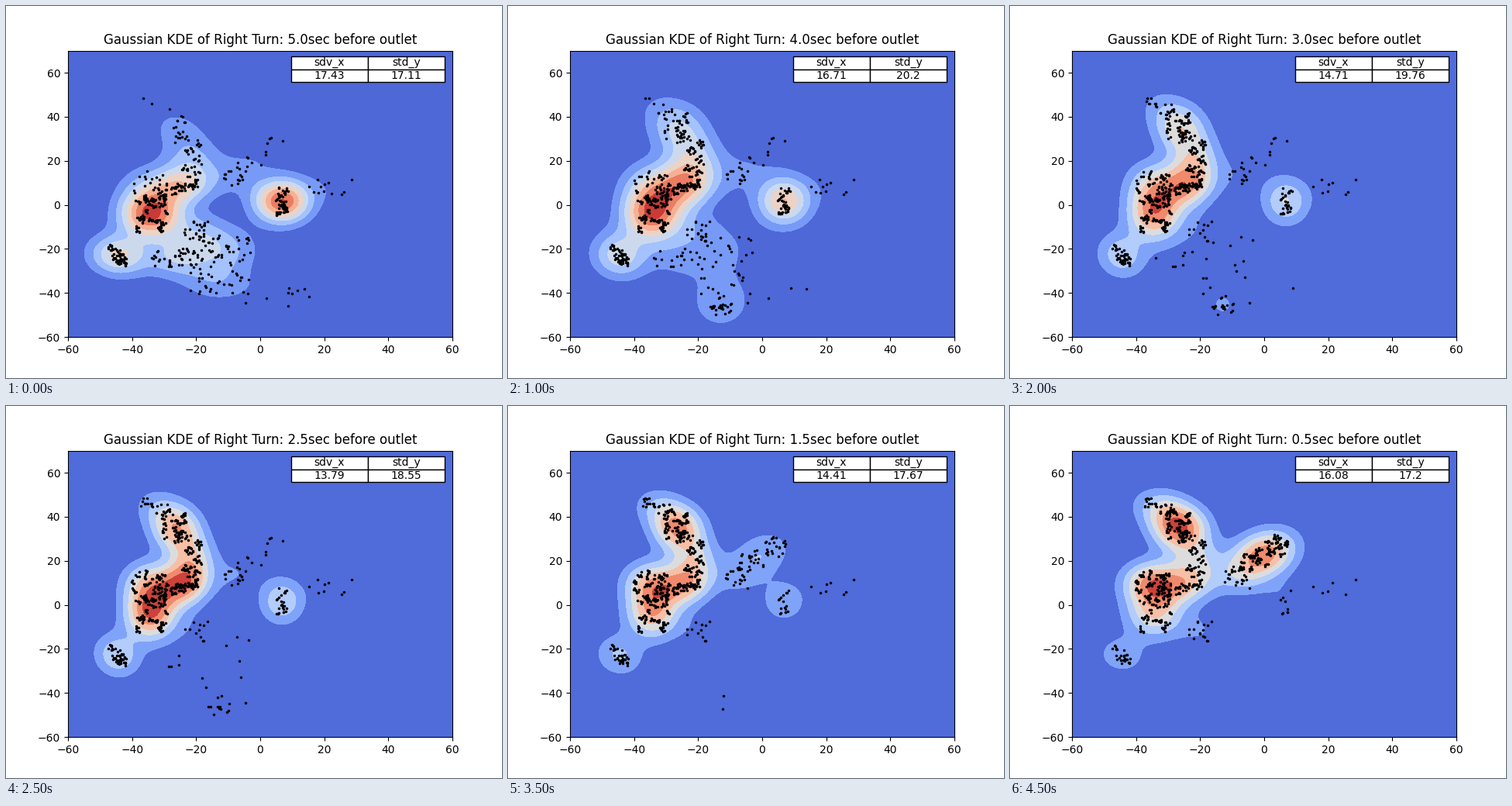
A matplotlib script that plays this animation: 640x480 px, repeating every 5 s.

```python
import numpy as np
import matplotlib.pyplot as plt
from matplotlib.animation import FuncAnimation

FRAMES = 10
STEP = np.arange(FRAMES)
T = STEP / (FRAMES - 1)

# spread shown in the table, at a few steps
KEYS = (0, 2, 3, 4, 6, 8, 9)
STD_X = np.interp(STEP, KEYS, (17.43, 16.71, 15.62, 14.71, 12.87, 15.95, 16.08))
STD_Y = np.interp(STEP, KEYS, (17.11, 20.2, 19.27, 19.76, 17.35, 17.99, 17.2))
# height of the density's peak
PEAK = np.interp(STEP, (0, 2, 6, 8, 9), (7.6, 7.8, 11, 7.5, 6.6))

BANDWIDTH = 0.335
POOL, CLUMPS = 170, 30
GX, GY = np.meshgrid(np.linspace(-60, 60, 161), np.linspace(-60, 70, 175))


def trend(start, end, hump=0):
    return start + (end - start) * T + hump * np.sin(np.pi * T)


def fade(start):
    return start * (1 - T) ** 3


def arrive(low, high, first, length):
    s = np.clip((STEP - first) / length, 0, 1)
    return low + (high - low) * s * s * (3 - 2 * s)


class Group:
    """Road users in a (sheared) box: centre, half sizes, share over time."""

    count = 0

    def __init__(self, x, y, w, h, share, slope=0, rate=6.5):
        Group.count += 1
        rng = np.random.default_rng(40 + Group.count)
        self.x, self.y, self.share, self.rate = x, y, share, rate
        self.cov = np.array([[w * w, slope * w * w],
                             [slope * w * w, h * h + (slope * w) ** 2]]) / 3
        u, v = rng.uniform(-1, 1, (2, CLUMPS))
        pick = np.arange(POOL) % CLUMPS
        jx, jy = rng.normal(0, 1, (2, POOL))
        self.px = x + w * u[pick] + 0.4 * jx
        self.py = y + h * v[pick] + slope * w * u[pick] + 0.6 * jy

    def dots(self, i):
        n = int(round(self.share[i] * self.rate))
        return self.px[:n], self.py[:n]

    def density(self, i):
        kernel = np.diag([STD_X[i], STD_Y[i]]) * BANDWIDTH
        (a, b), (_, c) = self.cov + kernel ** 2
        det = a * c - b * b
        dx, dy = GX - self.x, GY - self.y
        q = (c * dx * dx - 2 * b * dx * dy + a * dy * dy) / det
        return self.share[i] * np.exp(-q / 2) / np.sqrt(det)


groups = [
    # western junction
    Group(-34.3, -4, 5, 9, trend(21, 13, 3)),
    Group(-35, 10, 5.5, 6, trend(3, 15)),
    Group(-24.5, 8.5, 5, 2.5, trend(8, 7, 5), slope=0.35),
    # northern arm
    Group(-21.5, 20.5, 2.8, 10, trend(6, 9, 4)),
    Group(-26.5, 35, 4.2, 6, trend(2.5, 16, 2)),
    Group(-32, 44, 5, 2.5, trend(0.4, 7), slope=-0.6),
    # south-western arm
    Group(-44.7, -23, 2.8, 2.6, trend(9, 4, 1), slope=-1.3),
    # southern arm, emptying
    Group(-19.5, -12, 4, 4.5, trend(4, 2.5, -1.5)),
    Group(-26.5, -24, 7, 4, fade(6.5)),
    Group(-11.5, -20, 8, 7, fade(6.5)),
    Group(-13.5, -34.5, 9, 6, fade(5)),
    Group(-13, -46, 3, 3.5, T * fade(38)),
    Group(5, -42, 10, 4, fade(1.5)),
    # eastern stop line and outlet
    Group(6.8, 1.6, 1.5, 6, trend(16, 2.5, -1), rate=3.5),
    Group(-8, 13, 4, 5, trend(2.5, 4.5, -1.5)),
    Group(0, 23, 7, 6.5, arrive(1.8, 20, 6, 2.8), slope=0.7),
    Group(22, 8, 9, 4, trend(1.8, 1)),
]

fig, ax = plt.subplots(figsize=(6.4, 4.8), dpi=100)


def draw(i):
    ax.clear()
    z = sum(g.density(i) for g in groups)
    ax.contourf(GX, GY, z * PEAK[i] / z.max(), cmap="coolwarm")
    x, y = np.hstack([g.dots(i) for g in groups])
    ax.plot(x, y, "k.", markersize=3)
    table = ax.table(cellText=[[str(round(float(s[i]), 2)) for s in (STD_X, STD_Y)]],
                     colLabels=["sdv_x", "std_y"], colWidths=[0.2, 0.2],
                     cellLoc="center", loc="upper right")
    table.auto_set_font_size(False)
    table.set_fontsize(10)
    table.set_zorder(5)
    ax.set_xlim(-60, 60)
    ax.set_ylim(-60, 70)
    ax.set_title(f"Gaussian KDE of Right Turn: {5 - i / 2:.1f}sec before outlet")
    return []


anim = FuncAnimation(fig, draw, frames=FRAMES, interval=500,
                     repeat=True, repeat_delay=0, blit=False)
plt.show()
```
